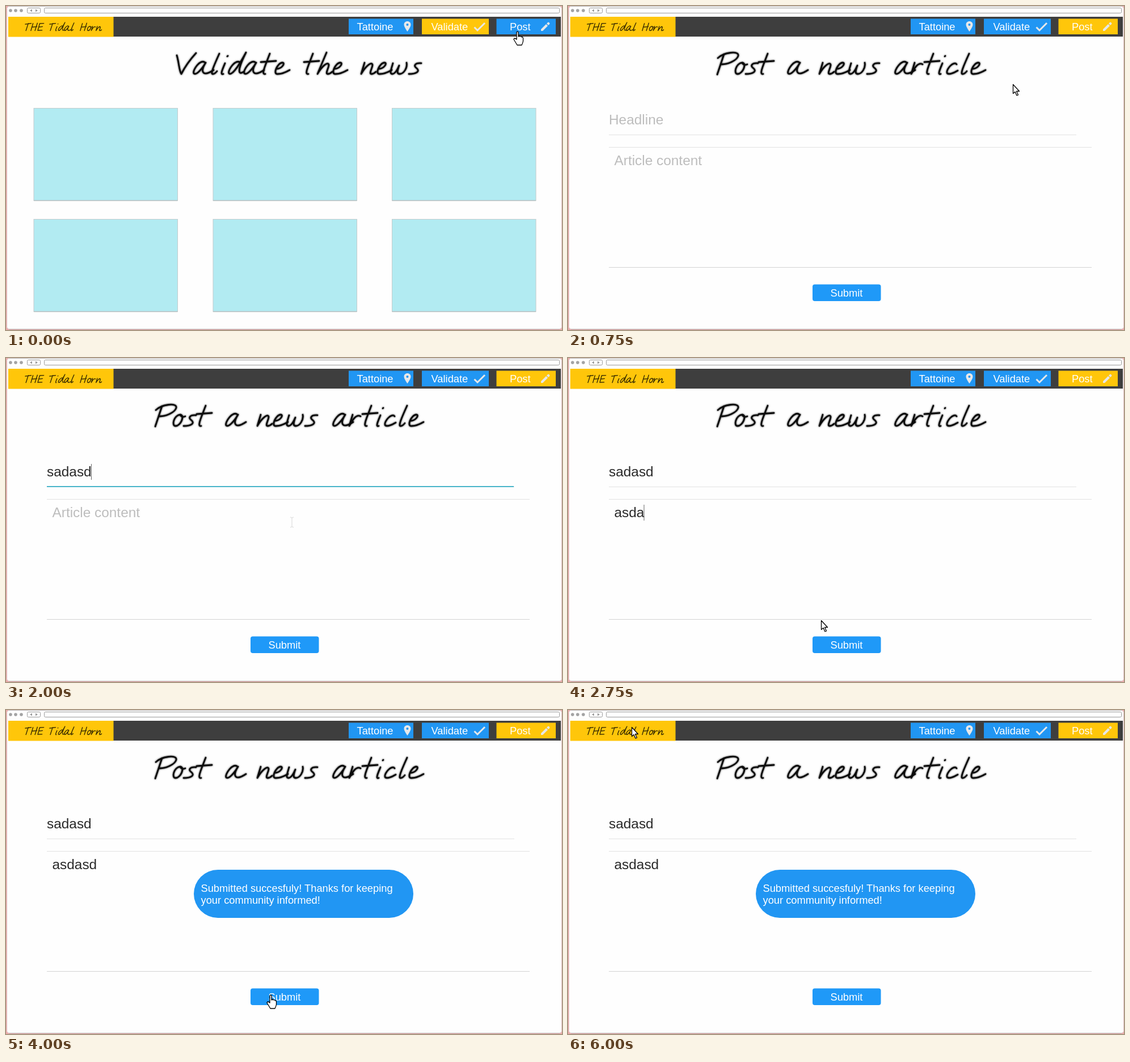
Write an HTML page that moves like this. It is 980x572 px and loops after 6.25 s.

```html
<!DOCTYPE html>
<html lang="en">
<head>
<meta charset="utf-8">
<title>Post a news article</title>
<style>
html, body { margin: 0; width: 100%; height: 100%; overflow: hidden; background: #eaa9a9; }
svg { display: block; width: 980px; height: 572px; font: 18.3px "Liberation Sans", Arial, sans-serif; }
.big { font-size: 24.4px; fill: #2a2a2a; }
.hint { fill: #bdbdbd; }
.white { fill: #fff; }
.blue { fill: #2196f3; }
.lettering { fill: none; stroke: #0a0a0a; stroke-width: 2.8; stroke-linecap: round; stroke-linejoin: round; filter: drop-shadow(0 0 1.5px #000c); }
.logo { stroke: #3d3000; stroke-width: 3.3; filter: drop-shadow(0 0 1px #0006); }
.outline { fill: #fff; stroke: #000; stroke-width: 1.3; stroke-linejoin: round; }
.caret { stroke: #666; }

/* One loop is 25 steps of 4 %, 250 ms each. */
.step { animation: 6.25s step-end infinite; }
.later { visibility: hidden; }
.bar { fill: #3e3e3e; animation-name: bar; }
.validate { animation-name: validate; }
.compose { animation-name: compose; }
.feed { animation-name: feed; }
.form { animation-name: form; }
.headline-hint { animation-name: headline-hint; }
.focus { animation-name: focus; }
.headline-1 { animation-name: headline-1; }
.headline-2 { animation-name: headline-2; }
.headline-caret { animation-name: headline-caret; }
.article-hint { animation-name: article-hint; }
.article-1 { animation-name: article-1; }
.article-2 { animation-name: article-2; }
.article-3 { animation-name: article-3; }
.article-caret { animation-name: article-caret; }
.toast { opacity: 0; animation-name: toast; }
.cursor { animation-name: cursor; }
.hand { animation-name: hand; }
.arrow { animation-name: arrow; }
.beam { animation-name: beam; }

@keyframes bar { 4% { fill: #262626; } 8% { fill: #111; } 12% { fill: #3e3e3e; } }
@keyframes validate { 0% { fill: #ffc60a; } 8% { fill: #3097e2; } 12% { fill: #2196f3; } }
@keyframes compose { 0% { fill: #2196f3; } 8% { fill: #edc31a; } 12% { fill: #ffc60a; } }
@keyframes feed { 0% { visibility: visible; } 12% { visibility: hidden; } }
@keyframes form { 8% { visibility: visible; } }
@keyframes headline-hint { 8% { visibility: visible; } 28% { visibility: hidden; } }
@keyframes focus { 24% { visibility: visible; } 36% { visibility: hidden; } }
@keyframes headline-1 { 28% { visibility: visible; } }
@keyframes headline-2 { 32% { visibility: visible; } }
@keyframes headline-caret {
  24% { visibility: visible; transform: translateX(0); }
  28% { visibility: visible; transform: translateX(39px); }
  32% { visibility: visible; transform: translateX(78px); }
  36% { visibility: hidden; }
}
@keyframes article-hint { 8% { visibility: visible; } 40% { visibility: hidden; } }
@keyframes article-1 { 40% { visibility: visible; } }
@keyframes article-2 { 44% { visibility: visible; } }
@keyframes article-3 { 48% { visibility: visible; } }
@keyframes article-caret {
  36% { visibility: visible; transform: translateX(0); }
  40% { visibility: visible; transform: translateX(26px); }
  44% { visibility: visible; transform: translateX(52px); }
  48% { visibility: hidden; }
}
@keyframes toast { 52% { opacity: .35; } 56% { opacity: .85; } 60% { opacity: 1; } }
@keyframes cursor {
  0% { transform: translate(901px, 45px); }
  4% { transform: translate(900px, 42px); }
  8% { transform: translate(898px, 37px); }
  12% { transform: translate(784px, 138px); }
  20% { transform: translate(640px, 208px); }
  24% { transform: translate(637px, 228px); }
  28% { transform: translate(504px, 290px); }
  40% { transform: translate(454px, 397px); }
  44% { transform: translate(446px, 463px); }
  48% { transform: translate(466px, 503px); }
  76% { transform: translate(430px, 440px); }
  80% { transform: translate(290px, 210px); }
  84% { transform: translate(150px, 70px); }
  88% { transform: translate(112px, 30px); }
}
@keyframes hand { 0% { visibility: visible; } 8% { visibility: hidden; } 48% { visibility: visible; } 76% { visibility: hidden; } }
@keyframes arrow { 8% { visibility: visible; } 16% { visibility: hidden; } 40% { visibility: visible; } 48% { visibility: hidden; } 76% { visibility: visible; } }
@keyframes beam { 20% { visibility: visible; } 40% { visibility: hidden; } }
</style>
</head>
<body>
<svg viewBox="0 0 980 572">
  <!-- browser window -->
  <rect x="1.5" y=".5" width="978" height="570" rx="4" fill="#fefefe" stroke="#d9b9b9"/>
  <path d="M5 .5H976M5 570.500H976" stroke="#b5b0b0"/>
  <g fill="#a3a3a3"><circle cx="8" cy="8" r="2.8"/><circle cx="17" cy="8" r="2.8"/><circle cx="27" cy="8" r="2.8"/></g>
  <g fill="#fff" stroke="#999">
    <rect x="37.500" y="3.500" width="23" height="9" rx="2"/>
    <rect x="67.500" y="3.500" width="908" height="9" rx="2"/>
  </g>
  <path d="M46 5.500V10.500L42 8ZM52 5.500V10.500L56 8Z" fill="#999"/>

  <!-- header -->
  <rect class="step bar" x="4" y="19" width="974" height="35"/>
  <rect x="4" y="19" width="185.500" height="35.500" fill="#ffc60a"/>
  <g class="lettering logo" data-text="THE Tidal Horn" transform="translate(34 43.500) scale(.38)"></g>
  <rect class="blue" x="604" y="22.500" width="114" height="27.500"/>
  <rect class="step validate" x="733" y="22.500" width="118" height="27.500"/>
  <rect class="step compose" x="864.500" y="22.500" width="104.500" height="27.500"/>
  <g class="white">
    <text x="618.500" y="42.500">Tattoine</text>
    <text x="749.500" y="42.500">Validate</text>
    <text x="888" y="42.500">Post</text>
  </g>
  <g fill="#e6e8ea">
    <path d="M707.500 27C704 27 701.500 29.500 701.500 33 701.500 37 707.500 45 707.500 45S713.500 37 713.500 33C713.500 29.500 711 27 707.500 27ZM707.500 31A2 2 0 1 1 707.400 31Z" fill-rule="evenodd"/>
    <path d="M943 41V44H946L955 35 952 32ZM953 31L956 34 958 32Q959 31 958 30L957 29Q956 28 955 29Z"/>
    <path d="M825.500 37.500L831 43 844 30" fill="none" stroke="#e6e8ea" stroke-width="3"/>
  </g>

  <!-- validation page -->
  <g class="step feed">
    <g class="lettering" data-text="Validate the news" transform="translate(301 120)"></g>
    <g id="cards" fill="#b2ebf2" stroke="#c3cccd"></g>
  </g>

  <!-- article form -->
  <g class="step form later">
    <g class="lettering" data-text="Post a news article" transform="translate(262 120)"></g>
    <path d="M72 227.500H896M72 249.500H923" stroke="#e2e2e2"/>
    <path d="M72 461.500H923" stroke="#d4d4d4"/>
    <rect x="431" y="491.500" width="120.500" height="29.500" rx="4" fill="#1f99f8"/>
    <text class="white" x="462.500" y="513">Submit</text>
  </g>
  <text class="big hint step headline-hint later" x="72" y="209">Headline</text>
  <path class="step focus later" d="M72 227H895" stroke="#48b5c9" stroke-width="2"/>
  <text class="big" x="72" y="209"><tspan class="step headline-1 later">sad</tspan><tspan class="step headline-2 later">asd</tspan></text>
  <path class="caret step headline-caret later" d="M72.500 187V215"/>
  <text class="big hint step article-hint later" x="81.500" y="281">Article content</text>
  <text class="big" x="81.500" y="281"><tspan class="step article-1 later">as</tspan><tspan class="step article-2 later">da</tspan><tspan class="step article-3 later">sd</tspan></text>
  <path class="caret step article-caret later" d="M82 259V287"/>

  <g class="step toast">
    <rect class="blue" x="331" y="282" width="387" height="85" rx="42.500"/>
    <g class="white">
      <text x="343.500" y="321">Submitted succesfuly! Thanks for keeping</text>
      <text x="343.500" y="342">your community informed!</text>
    </g>
  </g>

  <g class="step cursor">
    <path class="outline step hand later" d="M-1 1.500Q0-1 2 1V9Q4 7 5 9 7 7.500 8 10 10 9 10.500 12V17Q10 20 8 24H0Q-3 19-6 14-5 10-1 14Z"/>
    <path class="outline step arrow later" d="M.5 .5V16.500L4 13.500 7 20 9.500 19 6.500 12.500H11.500Z"/>
    <path class="step beam later" d="M-3-9Q0-9 0-7V7Q0 9-3 9M3-9Q0-9 0-7M0 7Q0 9 3 9" fill="none" stroke="#d8d8d8"/>
  </g>
</svg>
<script>
const SVG = "http://www.w3.org/2000/svg";

function add(parent, tag, attributes) {
  const node = document.createElementNS(SVG, tag);
  for (const name in attributes) node.setAttribute(name, attributes[name]);
  parent.append(node);
}

// Handwritten letters: advance width and pen path, with the baseline at y = 0.
const bowl = "M21-20C13-28-2-6 1-1 5 3 15-8";
const arch = "L0 0C8-14 19-23 20-16 20-11 13 0 18 0Q22 0 26-4";
const rounds = {
  a: [29, bowl + " 22-20 12-4 16 6 36-7"],
  d: [27, bowl + " 31-38 15-6 17 3 27-4"],
  c: [24, "M19-17C14-24 0-8 2-2 4 2 13-1 21-6"],
  e: [24, "M3-9C14-9 20-20 14-20 6-20-4 1 6 0Q15 0 27-7"],
  o: [19, "M13-20C2-19-3 0 5 0 14 0 22-19 13-20Q15-14 22-17"],
  s: [22, "M22-19C10-20 8-14 14-10 20-5 14 0 0 0"]
};
const stems = {
  h: [26, "M16-38" + arch],
  n: [27, "M6-20" + arch],
  r: [22, "M6-20L0 0C5-9 12-22 20-17"],
  i: [14, "M8-19C3-7-1 2 5 0M12-31l1-1"],
  l: [19, "M17-36C8-16 0 2 6 0Q9 0 13-5"],
  t: [25, "M17-36C9-15 1 2 9 0M1-21L28-23"],
  w: [33, "M5-19C1-6-1 0 4 0 9 0 13-8 16-15 12-4 12 0 17 0 24 0 31-11 29-20"]
};
const capitals = {
  E: [28, "M28-34L9-33 0-1 20-2M5-17L22-19"],
  H: [32, "M10-34L0 0M30-35L19 0M4-16L28-19"],
  P: [32, "M13-35L1 1M2-28C12-38 40-42 38-32 36-24 20-17 9-17"],
  T: [26, "M14-34L3 0M0-30L28-34"],
  V: [29, "M0-33C4-20 4-6 8 0 13-10 24-26 34-37"]
};
const letters = { ...rounds, ...stems, ...capitals, " ": [27, ""] };

for (const group of document.querySelectorAll(".lettering")) {
  const text = group.dataset.text;
  group.setAttribute("role", "img");
  group.setAttribute("aria-label", text);
  let x = 0;
  for (const letter of text) {
    const [width, d] = letters[letter];
    if (d) add(group, "path", { d, transform: `translate(${x})` });
    x += width;
  }
}

const cards = document.getElementById("cards");
for (const y of [180.5, 376.5]) {
  for (const x of [49, 365, 680.5]) {
    add(cards, "rect", { x, y, width: 253.5, height: 163 });
    add(cards, "path", { d: `M${x} ${y + 163}h253.5`, stroke: "#b5bcbd", "stroke-width": 1.5 });
  }
}
</script>
</body>
</html>
```
